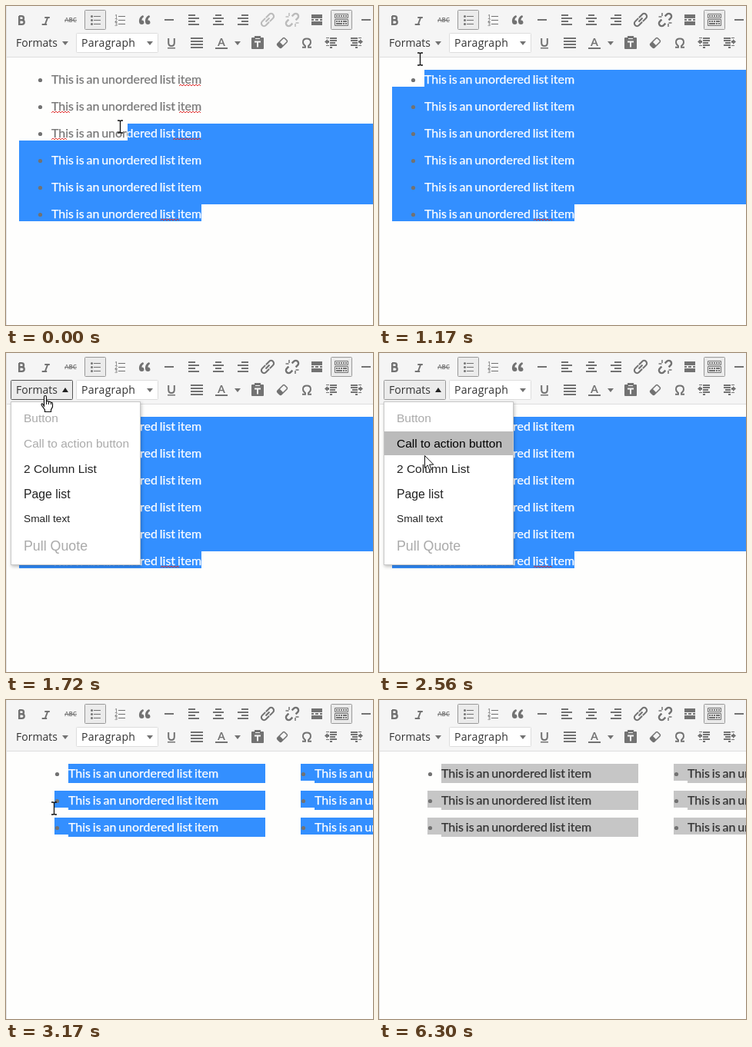
These frames come from a looping animation (477x415 px, 6320 ms). An HTML page:

```html
<!DOCTYPE html>
<html lang="en">
<head>
<meta charset="utf-8">
<title>List formatting</title>
<style>
  html, body { margin: 0; width: 100%; height: 100%; overflow: hidden; background: #fefefd; }
  svg { display: block; }
  text { white-space: pre; }
  .ui { font: 14px "Open Sans", sans-serif; fill: #333; }
  .item { font: 16px Lato, sans-serif; word-spacing: -1.25px; stroke-width: .25px; }
  .menu { font-family: "Liberation Sans", Arial, sans-serif; }
</style>
</head>
<body>
<svg id="stage" width="477" height="415" viewBox="0 0 477 415"></svg>
<script>
const LOOP = 6320, BLUE = '#338fff', INK = '#727272';
const LINE = 'This is an unordered list item';

// time, cursor kind, x, y
const pointer = [
  [0, 'beam', 148, 157], [120, 'beam', 125, 130], [250, 'beam', 92, 102], [370, 'beam', 72, 87],
  [510, 'beam', 66, 87], [630, 'beam', 61, 87], [900, 'beam', 59, 82], [1020, 'beam', 56, 74],
  [1170, 'beam', 53, 69], [1290, 'hand', 51, 56], [1440, 'hand', 51, 55],
  [2150, 'arrow', 46, 71], [2300, 'arrow', 53, 108], [2440, 'arrow', 57, 122], [2560, 'arrow', 59, 133],
  [2720, 'arrow', 59, 138], [2870, 'arrow', 57, 139], [3020, 'arrow', 57, 140],
  [3170, 'beam', 62, 141], [4060, 'beam', 120, 185], [4190, 'beam', 250, 290], [4310, 'beam', 363, 384],
  [4460, 'beam', 448, 416], [4610, 'none', 0, 0]
];
// time, first selected row, x where the selection begins
const drag = [[0, 2, 158], [120, 1, 130], [250, 0, 95], [370, 0, 76], [510, 0, 68], [630, 0, 59]];

const at = (steps, t) => steps.filter(s => s[0] <= t).pop();
const rect = (x, y, w, h, fill, more = '') => `<rect x="${x}" y="${y}" width="${w}" height="${h}" fill="${fill}" ${more}/>`;
const text = (x, y, s, more) => `<text x="${x}" y="${y}" ${more}>${s}</text>`;
const path = (d, more = '') => `<path d="${d}" ${more}/>`;
const group = (transform, body) => `<g transform="${transform}">${body}</g>`;
const frame = (x, y, w, h, fill, stroke) => rect(x + .5, y + .5, w - 1, h - 1, fill, `stroke="${stroke}" rx="1"`);
const dot = (x, y, r, fill) => `<circle cx="${x}" cy="${y}" r="${r}" fill="${fill}"/>`;
const caret = (x, up) => path(up ? `M${x - 4} 51h8l-4-6z` : `M${x - 4} 46h8l-4 5z`, `fill="${up ? '#222' : INK}"`);
// icons live in a 20 x 20 box centred on x, y
const icon = (x, y, body) => `<g transform="translate(${x - 10} ${y - 10})" fill="${INK}">${body}</g>`;
const line = (d, w = 2, color = INK, more = '') => path(d, `fill="none" stroke="${color}" stroke-width="${w}" ${more}`);
const keys = d => line(d, 2, INK, 'stroke-dasharray="2 1"');
const glyph = (x, y, s, size, weight = 600) =>
  text(x, y, s, `text-anchor="middle" font-family="Open Sans, sans-serif" font-size="${size}" font-weight="${weight}"`);

const chain = (color, broken) => broken
  ? group('rotate(-45 10 10)', line('M7 6.5H3.5a3.5 3.5 0 0 0 0 7H7M13 6.5h3.5a3.5 3.5 0 0 1 0 7H13', 2.4, color)) +
    line('M6 1v4M1.5 6h4M14 15v4M14.5 14h4', 1.5, color)
  : group('rotate(-45 10 10)',
    line('M9.5 6.5h-6a3.5 3.5 0 0 0 0 7h6M10.5 6.5h6a3.5 3.5 0 0 1 0 7h-6M6.5 10h7', 2.1, color));

const outdent = line('M8 4h9M8 7h9M8 10h7M8 13h9M8 16h3') + line('M3 3.5h4M3 13.5h4', 1) + path('M7 7H5V5L1 8.5 5 12v-2h2z');
const quote = path('M8 4Q2.9 6.4 2.9 11.5Q3 16 6.5 16Q9.5 15.8 9.5 13.2Q9.2 10 6.3 10.6Q6.3 7.6 9.2 6z');

const icons = [
  icon(20, 18, line('M7.2 5.1V15.9H10.5Q13.7 15.9 13.7 13.1T10.5 10.3H7.2M10.2 10.3Q13 10.3 13 7.7T10 5.1H7', 2.4)),
  icon(52, 18, line('M8.3 7h6.5M4.7 16h6.5M12.2 7L8.8 16', 2)),
  icon(84, 18, glyph(10, 13, 'ABC', 8) + line('M2 10.5h16', 1)),
  icon(116, 18, [5.5, 10.5, 15.5].map(y => dot(5.5, y, 1.5, INK) + rect(8, y - .5, 9, 1, INK)).join('')),
  icon(148, 18, [5, 10, 15].map((y, i) => glyph(5, y + 3, i + 1, 6.5) + rect(8, y, 9, 1, INK)).join('')),
  icon(180, 18, quote + group('translate(8 0)', quote)),
  icon(212, 18, rect(4, 9, 12, 2, INK)),
  icon(244, 18, line('M3 4h9M3 8h14M3 12h9M3 16h14')),
  icon(276, 18, line('M6 4h8M3 8h14M6 12h8M3 16h14')),
  icon(308, 18, line('M8 4h9M3 8h14M8 12h9M3 16h14')),
  icon(404, 18, rect(3, 3, 14, 5, INK) + line('M3 10h3M8 10h4M14 10h3') + rect(3, 12, 14, 5, INK)),
  icon(436, 18, line('M1.5 2.5h17v5h-17zM1.5 9.5h17v8h-17z', 1) + keys('M3 5h14M3 12h8M12 15h5') + line('M12 12h5M3 15h8')),
  icon(468, 18, rect(4, 9, 12, 2, INK)),
  icon(215, 48, line('M6.2 4V10Q6.2 14 10 14T13.8 10V4') + rect(5, 16, 10, 1.5, INK)),
  icon(248, 48, line('M2 4h16M2 8h16M2 12h16M2 16h16')),
  icon(280, 48, glyph(10, 14, 'A', 15) + rect(2, 16, 16, 2, INK)),
  icon(327, 48, rect(2, 3, 16, 15, INK, 'rx="1"') + rect(6, 1, 8, 4, INK) + rect(7, 4, 6, 1, '#f5f5f5') +
    line('M6 8.5h8M10 8v7.5', 2, '#f5f5f5')),
  icon(359, 48, group('rotate(-45 10 10)', rect(3.5, 6.5, 13, 7, 'none', `rx="1.5" stroke="${INK}" stroke-width="1.5"`) +
    rect(3.5, 6.5, 5, 7, INK))),
  icon(391, 48, line('M4 15.7h4V14Q5 12 5 9Q5 4.5 10 4.5T15 9Q15 12 12 14v1.7h4', 1.9)),
  icon(423, 48, outdent),
  icon(455, 48, group('matrix(-1 0 0 1 20 0)', outdent))
].join('');

const toolbar = rect(0, 0, 477, 66, '#f5f5f5') + rect(0, 66, 477, 1, '#dedede') + rect(0, 0, 1, 415, '#e2e2e2') +
  frame(102, 5, 28, 26, '#ebebeb', '#999') + frame(422, 5, 28, 26, '#ebebeb', '#999') +
  frame(91, 35, 107, 26, '#fff', '#ddd') + icons +
  text(98, 53, 'Paragraph', 'class="ui" letter-spacing=".3"') + caret(187) + caret(301);

const cursors = {
  none: '',
  beam: line('M-3-8H-.5L.5-7L1.5-8H4M.5-7V7M-3 8H-.5L.5 7L1.5 8H4', 1.3, '#111'),
  arrow: path('M.5.5V16.5L4.2 13L6.8 19.5L9.3 18.4L6.6 12.2H11.8z', 'fill="#fff" stroke="#111"'),
  hand: path('M-1.5 14V2Q-1.5.5 0 .5T1.5 2V8Q3 6.5 4.5 8.5Q6 7.5 7.5 9.5Q9.5 9 9.5 11V15L7.5 19V21.5H-.5V19L-4.7 13Q-5.5 10.5-3.5 11Z',
    'fill="#fff" stroke="#111" stroke-width="1.2"') + line('M1.5 8v4M4.5 9v3M7.5 10v2', 1, '#111')
};

const item = (x, y, color) => text(x, y, LINE, `class="item" fill="${color}" stroke="${color}"`);

function squiggle(x1, x2, row) {
  let d = `M${x1} ${104 + 35 * row}`;
  for (let x = x1; x < x2; x += 4) d += 'l2-2l2 2';
  return line(d, .9, '#e02020');
}

function singleList(t) {
  const [, row, x] = at(drag, t), top = 83 + 35 * row;
  const shape = `M${x} ${top}H477V258H254V280H17V${top + 22}H${x}z`;
  const lines = color => [0, 1, 2, 3, 4, 5].map(i => item(59, 101 + 35 * i, color)).join('');
  let out = lines('#777') + path(shape, `fill="${BLUE}"`) +
    `<clipPath id="sel">${path(shape)}</clipPath><g clip-path="url(#sel)">${lines('#fff')}</g>`;
  for (let i = 0; i < 6; i++) out += dot(44.5, 96.5 + 35 * i, 2.6, INK);
  if (t < 250) out += squiggle(225, 253, 0);
  if (t < 120) out += squiggle(59, 80, 1) + squiggle(225, 253, 1) + squiggle(59, 76, 2) + squiggle(217, 253, 2);
  return out + squiggle(201, 222, 5);
}

function columns(t) {
  const idle = t >= 6300, back = idle ? '#c6c6c6' : BLUE;
  let out = '';
  for (const x of [81, 401]) for (let i = 0; i < 3; i++) {
    const y = 83 + 35 * i;
    if (x > 81 || i) out += rect(x - 18, y, 18, 22, back);
    out += rect(x, y, 256, x > 81 && i == 2 ? 22 : 25, back) + dot(x - 14.5, y + 13.5, 2.6, INK) +
      item(x, y + 18, idle ? '#333' : '#fff');
  }
  return out;
}

function menu(t) {
  const hover = t < 2440 ? 0 : t < 2720 ? 1 : 2;
  const items = [['Button', 90, 15.5, 1], ['Call to action button', 123, 15.5, 1], ['2 Column List', 156, 15.5],
    ['Page list', 189, 15.8], ['Small text', 220, 13.7], ['Pull Quote', 257, 17.8, 1]];
  return rect(6.5, 63.5, 168, 212, '#fff', 'stroke="#c8c8c8" style="filter:drop-shadow(1px 2px 2px rgba(0,0,0,.25))"') +
    (hover ? rect(7, 69 + 33 * hover, 167, 31, '#bbb') : '') +
    items.map(([s, y, size, off], i) =>
      text(23, y, s, `class="menu" font-size="${size}" fill="${hover && i == hover ? '#000' : off ? '#aaa' : '#222'}"`)).join('');
}

function picture(t) {
  const open = t >= 1590 && t < 3170, hover = t >= 1290 && t < 2150;
  const [, kind, x, y] = at(pointer, t), linkColor = t < 900 ? '#bbb' : INK;
  return rect(0, 0, 477, 415, '#fefefd') + (t < 3170 ? singleList(t) : columns(t)) + toolbar +
    icon(340, 18, chain(linkColor)) + icon(372, 18, chain(linkColor, true)) +
    (open || hover ? frame(6, 35, 81, 26, open ? '#ebebeb' : '#fafafa', hover ? '#555' : '#999') : '') +
    text(13, 53, 'Formats', 'class="ui"') + caret(77, open) + (open ? menu(t) : '') +
    group(`translate(${x} ${y})`, cursors[kind]);
}

const stage = document.getElementById('stage');
const start = performance.now();
let shown = '';
function tick() {
  const next = picture((performance.now() - start) % LOOP);
  if (next !== shown) stage.innerHTML = shown = next;
  requestAnimationFrame(tick);
}
tick();
</script>
</body>
</html>
```
